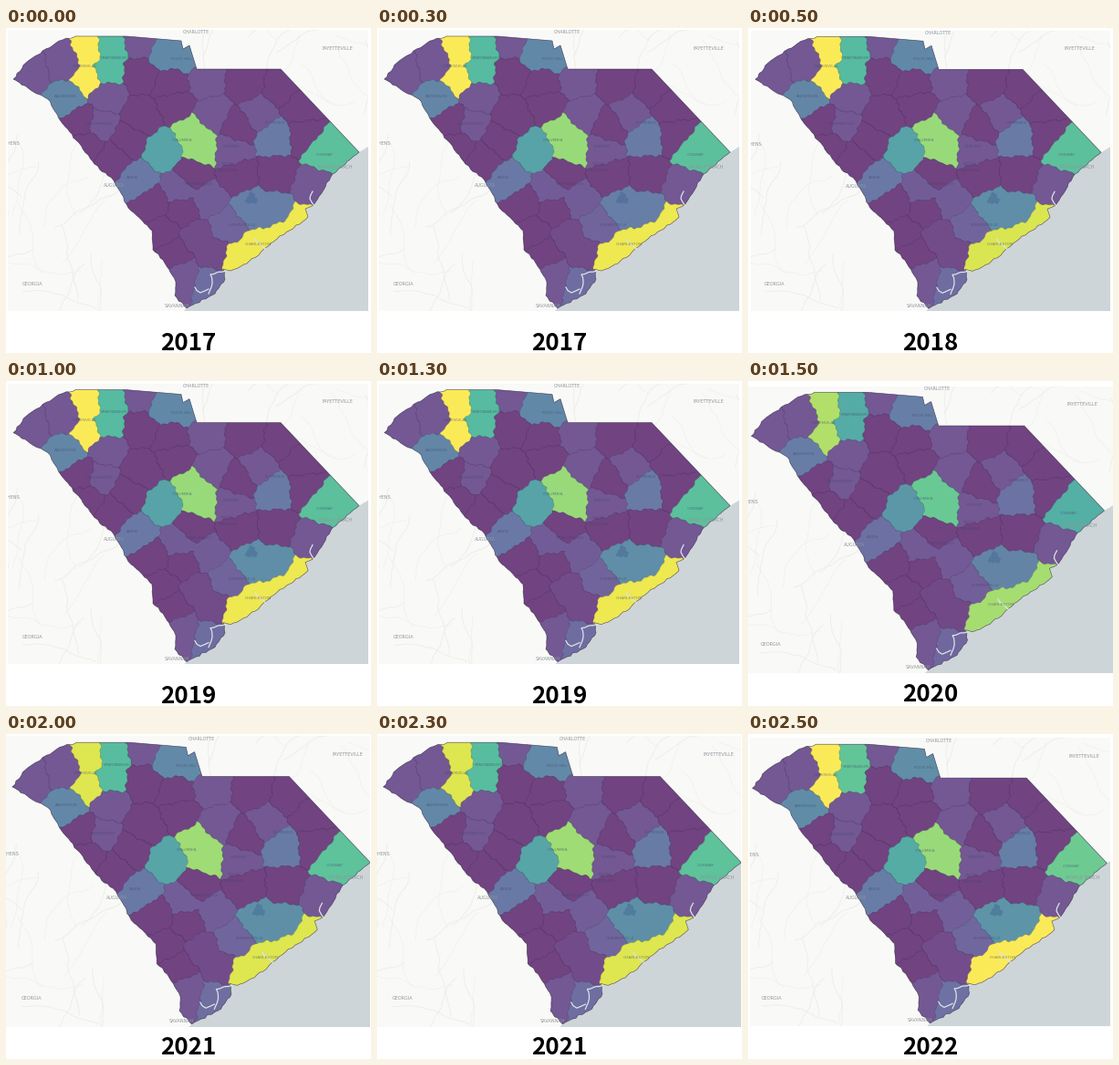
Animation of 400x356 px, one loop 3 s. Source, as a matplotlib script:

```python
import math
import random

import matplotlib.pyplot as plt
import numpy as np
from matplotlib.animation import FuncAnimation

W, H, DPI = 400, 356, 100
PX = 72 / DPI
MAP_H = 316
LAND, WATER, ROAD = "#f9f9f7", "#ced5d8", "#eeeeeb"
CMAP = plt.get_cmap("viridis")

# Each county is the area nearest to its centre (or to one of its centres).
DARK = [(148, 48), (182, 62), (84, 102), (148, 98), (186, 82), (90, 128),
        (116, 143), (134, 122), (160, 192), (262, 60), (302, 66), (254, 108),
        (322, 86), (326, 118), (204, 160), (254, 162), (298, 160),
        (194, 200), (172, 224), (184, 246)]
MUTED = [(25, 48), (65, 38), (148, 18), (102, 106), (109, 74), (218, 58),
         (226, 94), (246, 134), (276, 94), (333, 172), (194, 272)]
NAMED = {
    "Greenville": (1, [(90, 28), (89, 56)]),
    "Spartanburg": (.6, [(114, 26), (110, 46)]),
    "York": (.32, [(171, 28), (193, 30)]),
    "Anderson": (.31, [(68, 76)]),
    "Lexington": (.47, [(172, 134)]),
    "Richland": (.8, [(205, 115), (214, 132)]),
    "Aiken": (.24, [(144, 167)]),
    "Florence": (.25, [(296, 120)]),
    "Horry": (.63, [(345, 134)]),
    "Orangeburg": (.12, [(190, 176), (222, 188)]),
    "Berkeley": (.35, [(268, 196), (294, 198)]),
    "Dorchester": (.15, [(242, 216)]),
    "Charleston": (.97, [(252, 254), (274, 244), (305, 228), (324, 214)]),
    "Colleton": (.05, [(208, 228), (228, 248)]),
    "Beaufort": (.19, [(222, 278)]),
}

RIVER = [(198, 307), (185, 293), (186, 278), (172, 254), (161, 243),
         (160, 222), (134, 197), (118, 167), (97, 149), (77, 123), (60, 102),
         (46, 78), (30, 70), (8, 56), (22, 38), (40, 25), (62, 13), (76, 9)]
NORTH = [(76, 9), (132, 9), (192, 14), (194, 23), (201, 19), (209, 45),
         (301, 45), (387, 136)]
COAST = [(387, 136), (358, 160), (337, 194), (328, 198), (331, 207),
         (297, 231), (264, 258), (246, 266), (238, 264), (240, 275),
         (229, 291), (198, 307)]
INLETS = [[(241, 266), (224, 270), (226, 280), (222, 291)],
          [(222, 286), (213, 290), (207, 284)],
          [(284, 242), (278, 236), (273, 231)],
          [(338, 195), (333, 187), (336, 179)]]

# Year: (map box, scale, offset, overall level, changed values)
YEARS = {
    2017: ((2, 2, 397, 310), 1, (0, 0), 1, {"Berkeley": .27}),
    2018: ((3, 3, 397, 310), 1, (0, .3), 1, {"Charleston": .93}),
    2019: ((2, 3, 397, 310), 1, (0, .6), 1, {}),
    2020: ((0, 6, 400, 320), 1.021, (-4.6, 3.1), .85, {}),
    2021: ((0, 2, 399, 321), 1.0355, (-1.5, -.1), 1.02,
           {"Greenville": .94, "Charleston": .94}),
    2022: ((2, 4, 397, 320), 1.0255, (-3.5, 2), 1.1, {"Richland": .8}),
}

OUTER_LABELS = [
    ("CHARLOTTE", 208, 5), ("FAYETTEVILLE", 363, 22), ("ATHENS", 6, 127),
    ("AUGUSTA", 119, 173), ("GEORGIA", 29, 280), ("SAVANNAH", 187, 304),
    ("MYRTLE BEACH", 361, 152)]
INNER_LABELS = [
    ("ANDERSON", 65, 75), ("ROCK HILL", 192, 34), ("GREENVILLE", 86, 42),
    ("SPARTANBURG", 120, 33), ("GREENWOOD", 103, 105), ("COLUMBIA", 193, 123),
    ("SUMTER", 247, 130), ("FLORENCE", 295, 104), ("AIKEN", 138, 164),
    ("ORANGEBURG", 211, 171), ("CHARLESTON", 276, 237), ("CONWAY", 349, 139),
    ("SOUTH", 243, 149), ("CAROLINA", 243, 156), ("SUMMERVILLE", 259, 216)]


def tint(value):
    return .75 * np.array(CMAP(float(min(value, 1)))[:3]) + .25 * .96


def roughen(points, amount=.9):
    """Add small seeded bends between the key points of a shoreline."""
    rng = random.Random(3)
    out = []
    for (x0, y0), (x1, y1) in zip(points, points[1:]):
        steps = max(1, round(math.dist((x0, y0), (x1, y1)) / 4))
        for k in range(steps):
            t, d = k / steps, amount if k else 0
            out.append((x0 + (x1 - x0) * t + rng.uniform(-d, d),
                        y0 + (y1 - y0) * t + rng.uniform(-d, d)))
    return out + [points[-1]]


def county_grid(groups, step=1 / 3):
    """Number of the county at each grid point, with winding borders."""
    y, x = np.mgrid[0:MAP_H:step, 0:W:step]
    wx = x + .9 * np.sin(y / 2.7) + .6 * np.sin(y / 1.2 + x / 4)
    wy = y + .9 * np.sin(x / 2.9) + .6 * np.sin(x / 1.3 - y / 4)
    best = np.full(x.shape, np.inf)
    owner = np.zeros(x.shape, int)
    for i, centres in enumerate(groups):
        for cx, cy in centres:
            dist = (wx - cx) ** 2 + (wy - cy) ** 2
            nearer = dist < best
            best[nearer], owner[nearer] = dist[nearer], i
    return owner


def draw_roads():
    rng = random.Random(7)
    for i in range(38):
        x, y = rng.uniform(-20, 110), rng.uniform(100, 320)
        if i % 3 == 0:
            x, y = rng.uniform(200, 400), rng.uniform(-5, 60)
        heading = rng.uniform(0, math.tau)
        pts = [(x, y)]
        for _ in range(14):
            heading += rng.uniform(-.35, .35)
            x, y = x + 6 * math.cos(heading), y + 6 * math.sin(heading)
            pts.append((x, y))
        ax.plot(*zip(*pts), color=ROAD, lw=rng.choice((.4, .7)), zorder=1)


def label(text, x, y, size, color, alpha=1):
    ax.text(x, y, text, size=size * PX, color=color, alpha=alpha, ha="center",
            va="center", family="DejaVu Sans", clip_on=True, zorder=6)


fig = plt.figure(figsize=(W / DPI, H / DPI), dpi=DPI, facecolor="white")
ax = fig.add_axes([0, 0, 1, 1], facecolor=LAND)
ax.set(xticks=[], yticks=[])
for spine in ax.spines.values():
    spine.set_visible(False)

draw_roads()
coast = roughen(COAST)
sea = [(420, 118), (402, 127), *coast, (193, 312), (190, 330), (420, 330)]
ax.fill(*zip(*sea), color=WATER, lw=0, zorder=2)

groups = [[p] for p in DARK + MUTED] + [c for _, c in NAMED.values()]
owner = county_grid(groups)
border = np.zeros(owner.shape, bool)
border[1:] |= owner[1:] != owner[:-1]
border[:, 1:] |= owner[:, 1:] != owner[:, :-1]
shade = np.where(border, .62, 1)[..., None]

outline = roughen(RIVER) + NORTH + coast
state, = ax.fill(*zip(*outline), fc="none", ec=(.17, .13, .25, .75), lw=.45,
                 zorder=4)
counties = ax.imshow(np.ones(owner.shape + (3,)), extent=(0, W, MAP_H, 0),
                     aspect="auto", interpolation="hanning", zorder=3)
counties.set_clip_path(state)

angle = np.linspace(0, math.tau, 28)
radius = 6 + 1.4 * np.sin(3 * angle) + .7 * np.cos(7 * angle)
ax.fill(269 + radius * np.cos(angle), 187 + radius * np.sin(angle),
        color="#3f6593", alpha=.45, lw=0, zorder=4)
for path in INLETS:
    ax.plot(*zip(*roughen(path)), color="#dde3e6", lw=.9, zorder=5)

for text, x, y in OUTER_LABELS:
    label(text, x, y, 4.9, "#8f979c")
for text, x, y in INNER_LABELS:
    label(text, x, y, 4.4, "#3d4668", .55)

title = fig.text(.5, 0, "", size=26 * PX, weight="bold", color="black",
                 family="Noto Sans CJK JP", ha="center", va="center")


def update(i):
    year = 2017 + i
    (x0, y0, x1, y1), scale, (dx, dy), level, changes = YEARS[year]
    ax.set_position([x0 / W, 1 - y1 / H, (x1 - x0) / W, (y1 - y0) / H])
    ax.set_xlim((x0 - dx) / scale, (x1 - dx) / scale)
    ax.set_ylim((y1 - dy) / scale, (y0 - dy) / scale)

    values = [.02] * len(DARK) + [.1] * len(MUTED)
    values += [changes.get(name, v * level) for name, (v, _) in NAMED.items()]
    colors = np.array([tint(v) for v in values])
    counties.set_data(colors[owner] * shade)

    title.set_text(str(year))
    title.set_y(1 - (345.5 if year < 2020 else 343.5) / H)
    return counties, title


anim = FuncAnimation(fig, update, frames=len(YEARS), interval=500,
                     repeat=True, repeat_delay=0, blit=False)
plt.show()
```
